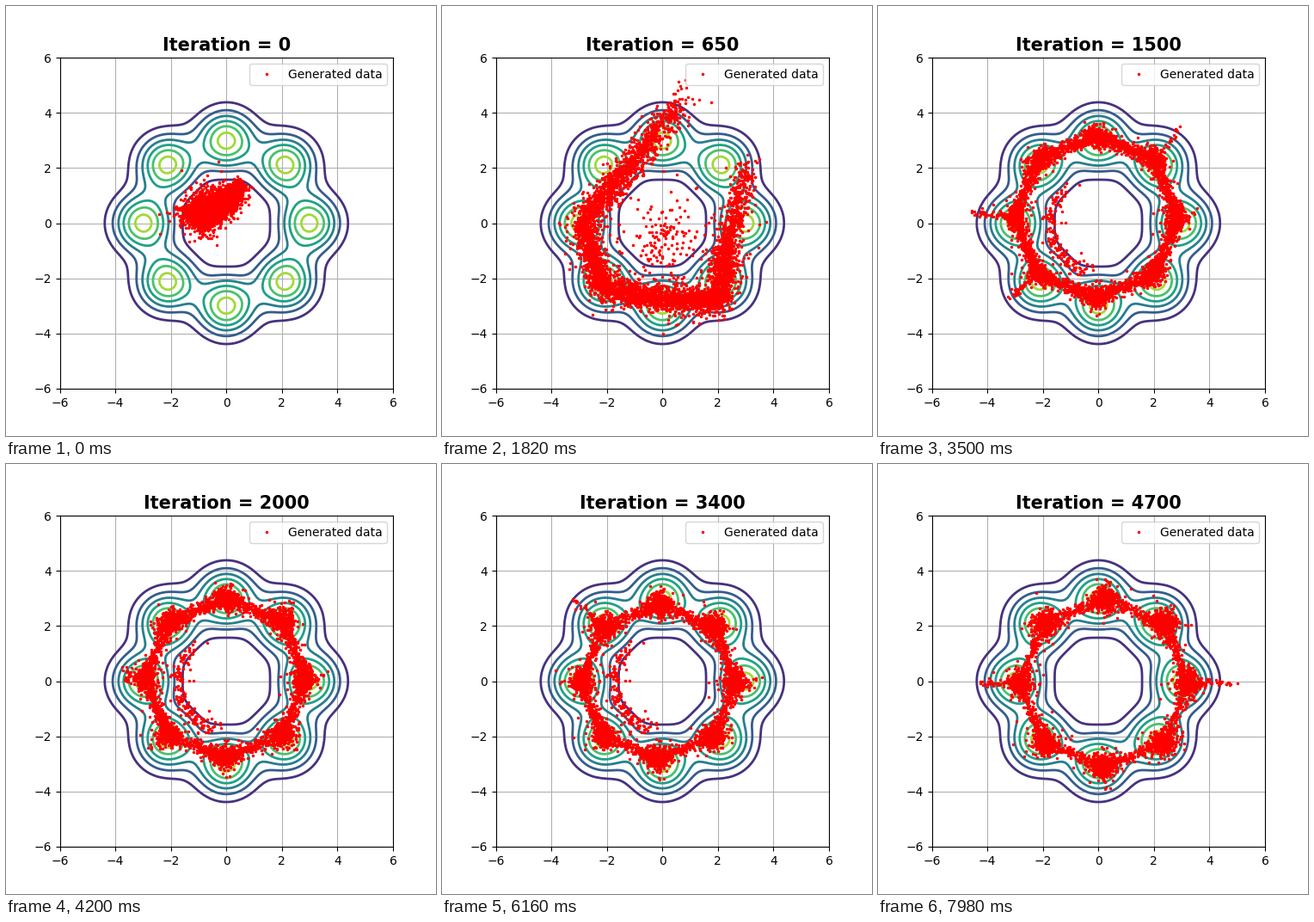
These frames come from a looping animation (500 px wide and 500 px high, 8000 ms). A matplotlib script:

```python
import numpy as np
import matplotlib.pyplot as plt
from matplotlib.animation import FuncAnimation

FRAMES, LOOP_MS = 58, 8000
COUNT = 5000
MODES = np.exp(1j * np.pi / 4 * np.arange(1, 10))  # closed, from upper right

# Complex numbers hold x + iy. Each point keeps its place along the path.
rng = np.random.default_rng(4)
order = (np.arange(COUNT) + 0.5) / COUNT
noise = rng.standard_t(6, COUNT) + 1j * rng.standard_t(6, COUNT)
reach = rng.random(COUNT)
stray = rng.random(COUNT) < 0.03


def trace(knots, u, width, grip=0.0):
    """Spread points over a path; grip pulls them towards the knots."""
    last = len(knots) - 1
    seg = np.minimum((u * last).astype(int), last - 1)
    s = u * last - seg
    for _ in range(2):
        s = s - grip * np.sin(2 * np.pi * s) / (2 * np.pi)
    line = np.interp(seg + s, np.arange(last + 1), knots)
    return line + width * (1 + 0.45 * grip * np.cos(2 * np.pi * s)) * noise


def arc(knots, width):
    """Open path that thins out at both ends."""
    u = 0.5 * order + 0.25 + np.arcsin(2 * order - 1) / (2 * np.pi)
    return trace(knots, u, width)


def ring(radius, shift, width, grip, spokes):
    """Closed path through the eight modes, with spokes leaving some of them."""
    knots = radius * MODES + shift
    z = trace(knots, order, width, grip)
    for k in spokes:
        out = (np.rint(order * 8) == k) & (np.arange(COUNT) % 9 == 0)
        z[out] = knots[k] * (1 + 0.5 * reach[out] ** 2) + 0.06 * noise[out]
    return z


def scatter(z, inner):
    return np.where(stray, inner, z)


start = arc([0.5 + 1.4j, -0.1 + 0.75j, -0.8 + 0.4j, -1.1 + 0.45j],
            0.06 + 0.2 * np.sqrt(order))
crescent = arc([0.8 + 5j, -1.2 + 2.2j, -3.1 + 0j, -2.4 - 2.3j,
                -0.8 - 2.8j, 2 - 4.5j], 0.2)
horseshoe = arc([0.9 + 4.7j, -1.1 + 2.2j, -2.9 + 0.1j, -2.2 - 2.3j,
                 0 - 2.75j, 2 - 2.8j, 2.3 - 0.9j, 3.1 + 2.4j], 0.2)
cloud = 0.1 - 0.6j + 0.65 * noise
inside = 1.75 * np.exp(1j * np.pi * (0.72 + 0.7 * reach)) + 0.12 * noise

# Step at which each pose is reached.
poses = {
    0: start,
    6: crescent,
    13: scatter(horseshoe, cloud),
    25: scatter(ring(2.95, -0.1 + 0.25j, 0.12, 0.4, (0, 3, 4)), inside),
    35: scatter(ring(2.85, 0, 0.12, 0.75, (6,)), inside),
    44: scatter(ring(2.8, -0.15, 0.12, 0.8, (2,)), inside),
    57: ring(3.05, 0.2 - 0.05j, 0.12, 0.95, (3, 7)),
}
steps = list(poses)


def points(step):
    j = min(np.searchsorted(steps, step, side="right"), len(steps) - 1)
    a, b = steps[j - 1], steps[j]
    f = (step - a) / (b - a)
    return (1 - f) * poses[a] + f * poses[b]


def density(z):
    return 6.45 * sum(np.exp(-abs(z - 3 * m) ** 2 / 1.02) for m in MODES[:8])


fig, ax = plt.subplots(figsize=(5, 5), dpi=100)
axis = np.linspace(-6, 6, 121)
gx, gy = np.meshgrid(axis, axis)
ax.contour(gx, gy, density(gx + 1j * gy), levels=np.arange(8),
           cmap="viridis", linewidths=2)
ax.set(xlim=(-6, 6), ylim=(-6, 6))
ax.grid(True)
dots, = ax.plot([], [], "r.", markersize=3, label="Generated data")
ax.legend(loc="upper right")
title = ax.set_title("", fontsize=15, fontweight="bold")


def draw(step):
    iteration = 50 * step if step <= 20 else 100 * step - 1000
    title.set_text(f"Iteration = {iteration}")
    z = points(step)
    dots.set_data(z.real, z.imag)
    return dots, title


anim = FuncAnimation(fig, draw, frames=FRAMES, interval=LOOP_MS / FRAMES,
                     repeat=True, repeat_delay=0)
plt.show()
```
